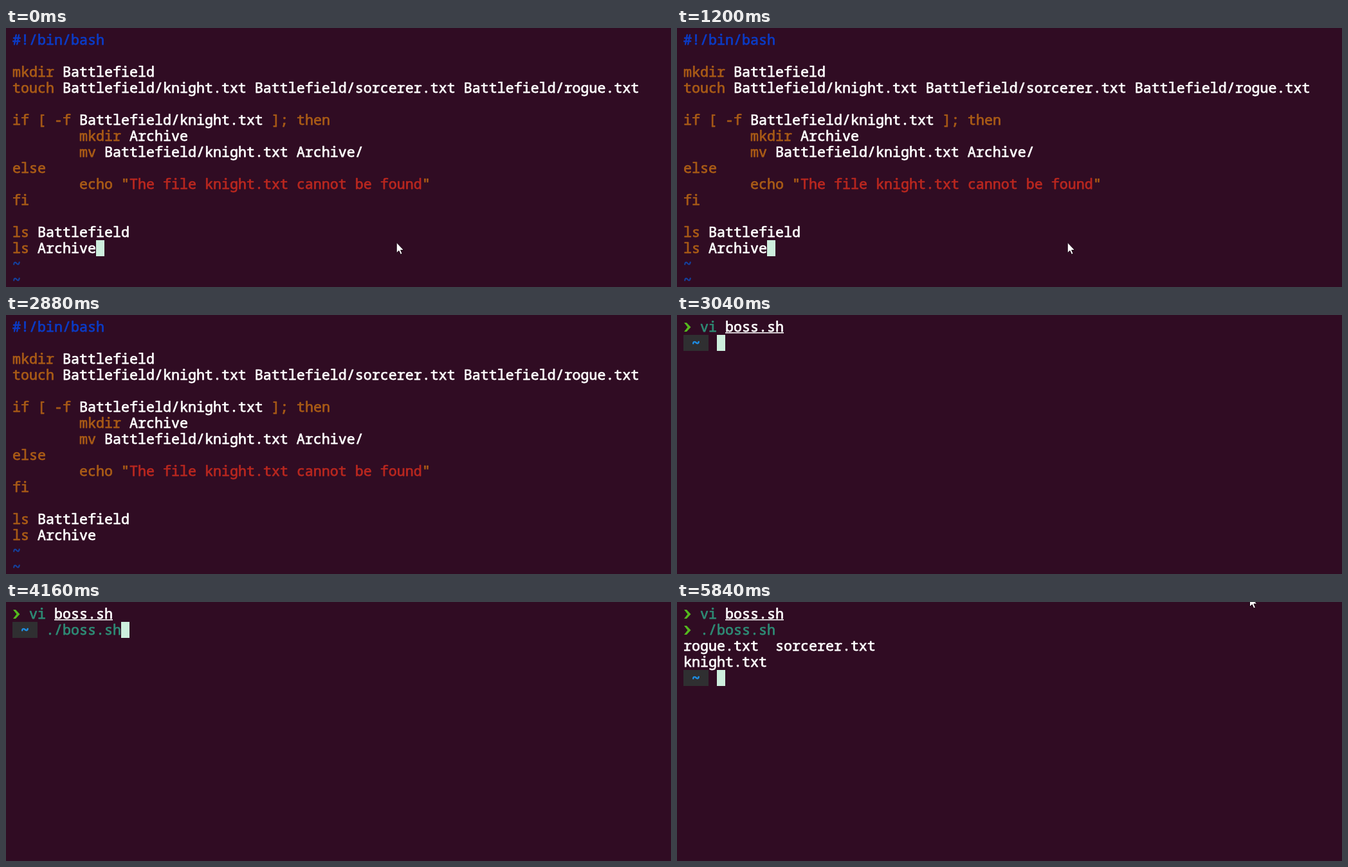
These frames come from a looping animation (1034x404 px, 6080 ms). An HTML page:

```html
<!DOCTYPE html>
<html lang="en">
<head>
<meta charset="utf-8">
<title>Terminal session</title>
<style>
  html, body { margin: 0; width: 100%; height: 100%; overflow: hidden; background: #300c23; }
  svg { display: block; width: 1034px; height: 404px; }
  text {
    font: 400 21.667px "Noto Sans Mono", "DejaVu Sans Mono", monospace;
    font-variant-ligatures: none;
    white-space: pre;
    stroke-width: 0.75px;
    stroke-linejoin: round;
  }
</style>
</head>
<body>
<svg id="stage" viewBox="0 0 1034 404" xmlns="http://www.w3.org/2000/svg"></svg>
<script>
const LOOP = 6080;
const LEFT = 10, TOP = 6, CELL_W = 13, CELL_H = 25, BASELINE = 20;
const COLORS = {
  bg: "#300c23", white: "#ffffff", orange: "#a95b16", blue: "#0b3bc6", navy: "#1444a4",
  red: "#b9271f", teal: "#2e8b75", green: "#54b81e", grey: "#77706f",
  sky: "#1f8fe6", badge: "#2f2f31", cursor: "#cdeedd"
};
const TIMES = {
  escape: 1760, command: 2800, shell: 2960, dot: 3440, slash: 3600,
  firstLetter: 3840, secondLetter: 4000, complete: 4160,
  enter: 4400, output: 4480, prompt: 4720, pointer: 5600, pointerRest: 5840
};

const stage = document.getElementById("stage");
const colX = col => LEFT + col * CELL_W;
const rowY = row => TOP + row * CELL_H;

function add(parent, tag, attrs, content) {
  const node = document.createElementNS("http://www.w3.org/2000/svg", tag);
  for (const key in attrs) node.setAttribute(key, attrs[key]);
  if (content) node.textContent = content;
  parent.appendChild(node);
  return node;
}
const group = () => add(stage, "g", {});
const show = (node, visible) => node.setAttribute("visibility", visible ? "visible" : "hidden");

// The thin outline in the text's own colour gives a medium weight.
function tint(node, color) {
  node.setAttribute("fill", COLORS[color]);
  node.setAttribute("stroke", COLORS[color]);
}
function write(parent, row, col, content, color) {
  const node = add(parent, "text", { x: colX(col), y: rowY(row) + BASELINE }, content);
  tint(node, color);
  return node;
}
function block(parent, row, col, width, color) {
  return add(parent, "rect", {
    x: colX(col), y: rowY(row), width: width * CELL_W, height: CELL_H, fill: COLORS[color]
  });
}
function underline(parent, row, col, width, color) {
  return add(parent, "rect", {
    x: colX(col), y: rowY(row) + BASELINE + 1, width: width * CELL_W, height: 1.5, fill: COLORS[color]
  });
}

// Writes [text, color] runs one after another on a row.
function line(parent, row, col, ...runs) {
  for (const [content, color] of runs) {
    write(parent, row, col, content, color);
    col += content.length;
  }
}
function chevron(parent, row) {
  add(parent, "path", {
    d: "M1 6H5L11.5 13L5 20H1L6.5 13Z", fill: COLORS.green,
    transform: `translate(${LEFT} ${rowY(row)})`
  });
}
function promptBadge(parent, row) {
  block(parent, row, 0, 3, "badge");
  write(parent, row, 1, "~", "sky").style.fontWeight = 700;
}

function buildEditor() {
  const g = group();
  line(g, 0, 0, ["#!/bin/bash", "blue"]);
  line(g, 2, 0, ["mkdir ", "orange"], ["Battlefield", "white"]);
  line(g, 3, 0, ["touch ", "orange"],
    ["Battlefield/knight.txt Battlefield/sorcerer.txt Battlefield/rogue.txt", "white"]);
  line(g, 5, 0, ["if [ -f ", "orange"], ["Battlefield/knight.txt", "white"], [" ]; then", "orange"]);
  line(g, 6, 8, ["mkdir ", "orange"], ["Archive", "white"]);
  line(g, 7, 8, ["mv ", "orange"], ["Battlefield/knight.txt Archive/", "white"]);
  line(g, 8, 0, ["else", "orange"]);
  line(g, 9, 8, ['echo "', "orange"], ["The file knight.txt cannot be found", "red"], ['"', "orange"]);
  line(g, 10, 0, ["fi", "orange"]);
  line(g, 12, 0, ["ls ", "orange"], ["Battlefield", "white"]);
  line(g, 13, 0, ["ls ", "orange"], ["Archive", "white"]);
  for (const row of [14, 15]) write(g, row, 0, "~", "navy");
  return g;
}

function buildShell() {
  const g = group();
  chevron(g, 0);
  line(g, 0, 2, ["vi ", "teal"], ["boss.sh", "white"]);
  underline(g, 0, 5, 7, "white");
  return g;
}

function buildInput() {
  const g = group();
  promptBadge(g, 1);
  return {
    g,
    typed: write(g, 1, 4, "", "teal"),
    rule: underline(g, 1, 4, 0, "teal"),
    hint: write(g, 1, 4, "", "grey")
  };
}

function buildCommand() {
  const g = group();
  chevron(g, 1);
  write(g, 1, 2, "./boss.sh", "teal");
  return g;
}

function buildOutput() {
  const g = group();
  write(g, 2, 0, "rogue.txt  sorcerer.txt", "white");
  write(g, 3, 0, "knight.txt", "white");
  return g;
}

const editor = buildEditor();
const shell = buildShell();
const input = buildInput();
const command = buildCommand();
const output = buildOutput();
const nextPrompt = group();
promptBadge(nextPrompt, 4);

const cursor = group();
block(cursor, 0, 0, 1, "cursor");
const cursorLetter = write(cursor, 0, 0, "", "bg");

const pointer = add(stage, "path", {
  d: "M0 0V16.5L3.8 13L6.3 18.8L8.9 17.6L6.4 12H11.4Z",
  fill: "#fff", stroke: "#1c0715", "stroke-width": 1
});

function typedAt(t) {
  if (t < TIMES.dot) return "";
  if (t < TIMES.slash) return ".";
  if (t < TIMES.firstLetter) return "./";
  if (t < TIMES.secondLetter) return "./b";
  return t < TIMES.complete ? "./bo" : "./boss.sh";
}

// Returns [row, column, covered letter], or null while the cursor is off stage.
function cursorAt(t, typed, hint) {
  if (t < TIMES.escape) return [13, 10, ""];
  if (t < TIMES.command) return [13, 9, "e"];
  if (t < TIMES.shell) return null;
  if (t < TIMES.enter) return [1, 4 + typed.length, hint.charAt(0)];
  if (t < TIMES.output) return [2, 0, ""];
  return t < TIMES.prompt ? [4, 0, ""] : [4, 4, ""];
}

function pointerAt(t) {
  if (t < TIMES.escape) return [607.2, 334.5];
  if (t < TIMES.pointer) return null;
  const p = Math.min(1, (t - TIMES.pointer) / (TIMES.pointerRest - TIMES.pointer));
  return [908 - 17.5 * p, -16 + 7 * p];
}

function place(node, position) {
  show(node, !!position);
  if (position) node.setAttribute("transform", `translate(${position[0]} ${position[1]})`);
}

function render(t) {
  const typed = typedAt(t);
  const suggested = typed === "." || typed === "./";
  const hint = suggested ? "./filemanipulate.sh".slice(typed.length) : "";

  show(editor, t < TIMES.shell);
  show(shell, t >= TIMES.shell);
  show(input.g, t >= TIMES.shell && t < TIMES.enter);
  show(command, t >= TIMES.enter);
  show(output, t >= TIMES.output);
  show(nextPrompt, t >= TIMES.prompt);

  input.typed.textContent = typed;
  input.rule.setAttribute("width", t < TIMES.complete ? typed.length * CELL_W : 0);
  input.hint.textContent = hint;
  input.hint.setAttribute("x", colX(4 + typed.length));

  const cell = cursorAt(t, typed, hint);
  place(cursor, cell && [cell[1] * CELL_W, cell[0] * CELL_H]);
  cursorLetter.textContent = cell ? cell[2] : "";
  tint(cursorLetter, hint ? "grey" : "bg");
  place(pointer, pointerAt(t));
}

const start = performance.now();
function tick() {
  render((performance.now() - start) % LOOP);
  requestAnimationFrame(tick);
}
tick();
</script>
</body>
</html>
```
